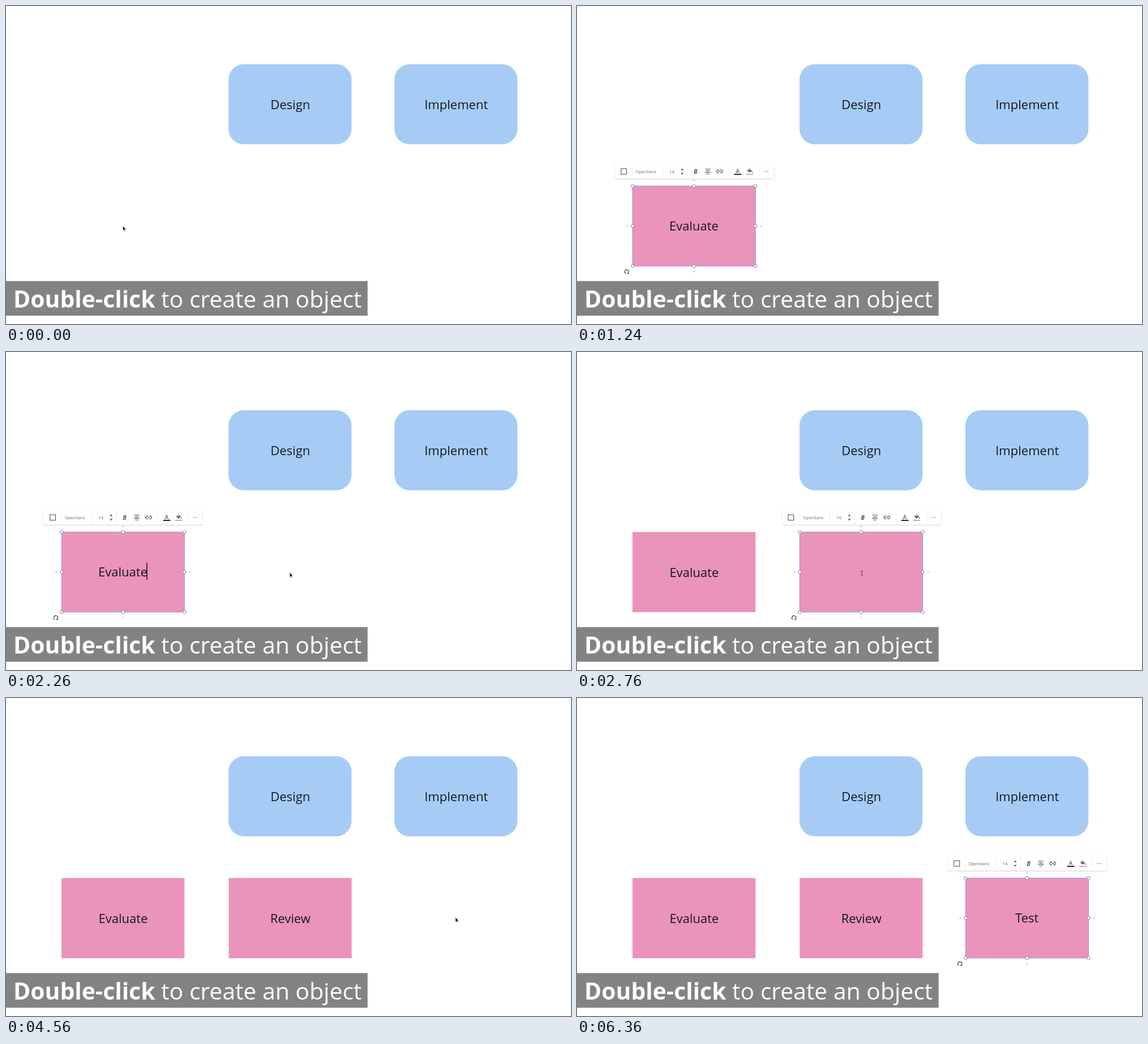
An HTML page for the animation above (6400 ms loop, 998 by 561 pixels).

```html
<!DOCTYPE html>
<html lang="en">
<head>
<meta charset="utf-8">
<title>Double-click to create an object</title>
<style>
  html, body { margin: 0; width: 100%; height: 100%; overflow: hidden; background: #fff; }
  svg { display: block; width: 998px; height: 561px; font-family: "Open Sans", sans-serif; }
  .label { font-size: 22px; fill: #16161f; text-anchor: middle; }
  .bar { filter: drop-shadow(0 1px 1.5px rgba(0,0,0,.16)); }
  .icon { fill: none; stroke: #555; stroke-width: 1.1; }
  .small { font-size: 7.6px; fill: #666; }
</style>
</head>
<body>
<svg viewBox="0 0 998 561">
  <defs>
    <g id="toolbar">
      <rect class="bar" x="67" y="279" width="280.5" height="25.5" rx="1" fill="#fff"/>
      <path d="M98.5 279v25M151.5 279v25M194.5 279v25M268.5 279v25M322.5 279v25" stroke="#f0f0f0"/>
      <rect class="icon" x="77.7" y="287" width="9.8" height="9.8"/>
      <text class="small" x="103.8" y="295">OpenSans</text>
      <path d="M183.2 289.6l2.6-3 2.6 3zM183.2 294.4l2.6 3 2.6-3z" fill="#555"/>
      <text x="206.3" y="295.6" font-size="10.5" font-weight="700" font-style="italic" fill="#555">B</text>
      <path class="icon" d="M226 287.8h10M228 290.6h6M226 293.4h10M228 296.2h6"/>
      <path class="icon" d="M250.8 289.4h-1.6a2.5 2.5 0 0 0 0 5h1.6M253.2 289.4h1.6a2.5 2.5 0 0 1 0 5h-1.6M249.6 291.9h4.8"/>
      <text x="283.8" y="294.8" font-size="10.5" text-anchor="middle" fill="#444">A</text>
      <path d="M277.7 297h12.6" stroke="#222" stroke-width="2"/>
      <path d="M301.6 290.4l3.2-3.2 3.6 3.6z" class="icon"/>
      <path d="M301.4 290.6h7l-3.6 3.4zM309.4 291.8q1.6 2.4 0 2.4t0-2.4z" fill="#555"/>
      <path d="M298.6 297h12.6" stroke="#e79ab8" stroke-width="2"/>
      <path d="M330.2 292h8" stroke="#888" stroke-width="1.3" stroke-dasharray="1.4 1.8"/>
    </g>
    <g id="frame">
      <rect x="98.2" y="317.8" width="217" height="141" fill="none" stroke="#9090dc"/>
      <g id="knobs" fill="#fff" stroke="#777" stroke-width=".9"></g>
      <g fill="#b9d3ee">
        <circle cx="206.7" cy="308" r="1.4"/><circle cx="206.7" cy="468.3" r="1.4"/>
        <circle cx="88.5" cy="388.2" r="1.4"/><circle cx="324.8" cy="388.2" r="1.4"/>
      </g>
      <path d="M86 472a3.7 3.7 0 1 1 5.5-2" fill="none" stroke="#333" stroke-width="1.1"/>
      <path d="M88.2 471.6l3.4-1.6v3.2z" fill="#333"/>
    </g>
  </defs>

  <g fill="#a6ccf6">
    <rect x="393" y="102.8" width="217.4" height="141.2" rx="27"/>
    <rect x="686" y="102.8" width="217.4" height="141.2" rx="27"/>
  </g>
  <text class="label" x="502.2" y="182">Design</text>
  <text class="label" x="795.2" y="182">Implement</text>
  <g id="cards"></g>
  <rect y="485.3" width="638.7" height="61.1" fill="#838383"/>
  <text x="13" y="531.6" font-size="40.9" fill="#fff"><tspan font-weight="700">Double-click</tspan> to create an object</text>
  <path id="arrow" d="M0 0v8l1.8-1.6 1.3 2.9 1.3-.6-1.3-2.8h2.3z" fill="#111" stroke="#fff" stroke-width=".4"/>
  <path id="beam" d="M-1.6-3.8q1.6 0 1.6 1v5.6q0 1-1.6 1M1.6-3.8q-1.6 0-1.6 1M0 2.8q0 1 1.6 1" fill="none" stroke="#333" stroke-width=".9"/>
</svg>
<script>
const LOOP = 6400, BLINK = 530;
const $ = id => document.getElementById(id);
const show = (el, on) => el.setAttribute('display', on ? 'inline' : 'none');
const place = (el, [x, y]) => el.setAttribute('transform', `translate(${x} ${y})`);

// start / end: selected span; delay / step: typing rhythm
const cards = [
  { word: 'Evaluate', dx: 0, start: 690, end: 2665, delay: 120, step: 50, size: 10 },
  { word: 'Review', dx: 295.3, start: 2700, end: 4400, delay: 200, step: 90, size: 10 },
  { word: 'Test', dx: 588.3, start: 5300, end: LOOP, delay: 250, step: 110, size: 14 }
];
const stops = [[206.5, 388], [501.2, 389], [794, 387]];
const moves = [[1500, 2200], [3500, 4005]];

for (const x of [98.2, 206.7, 315.2])
  for (const y of [317.8, 388.2, 458.8])
    if (x !== 206.7 || y !== 388.2)
      $('knobs').innerHTML += `<circle cx="${x}" cy="${y}" r="2.8"/>`;

$('cards').innerHTML = cards.map(c => `<g transform="translate(${c.dx} 0)">
  <rect x="98" y="317.6" width="217.3" height="141.4" fill="#eb94bb"/>
  <text class="label"></text>
  <g><use href="#toolbar"/><text class="small" x="167.6" y="295" text-anchor="middle"></text><use href="#frame"/></g>
  <path stroke="#16161f" stroke-width="1.6"/></g>`).join('');
cards.forEach((c, i) => {
  c.el = $('cards').children[i];
  [, c.label, c.tools, c.caret] = c.el.children;
  c.sizeText = c.tools.children[1];
});

function drawCard(c, t) {
  const age = t - c.start, selected = age >= 0 && t < c.end;
  show(c.el, age >= 0);
  show(c.tools, selected);
  if (age < 0) return;
  const count = Math.max(0, Math.floor((age - c.delay) / c.step) + 1);
  c.label.textContent = c.word.slice(0, count);
  c.label.setAttribute('x', selected ? 206.4 : 206.9);
  c.label.setAttribute('y', selected ? 395.7 : 396.7);
  c.sizeText.textContent = count ? 14 : c.size;
  show(c.caret, selected && age % BLINK >= BLINK / 2);
  c.caret.setAttribute('d', `M${205.4 + c.label.getComputedTextLength() / 2} 372v30`);
}

function drawPointer(t) {
  let pos = stops[0];
  moves.forEach(([from, to], i) => {
    const p = Math.min(1, Math.max(0, (t - from) / (to - from)));
    const e = p * p * (3 - 2 * p);
    if (p > 0) pos = stops[i].map((v, k) => v + (stops[i + 1][k] - v) * e);
  });
  const fresh = cards.some(c => t >= c.start && t < c.start + c.delay);
  const hidden = cards.some((c, i) => t >= c.start && t < (moves[i] ? moves[i][0] : LOOP));
  show($('arrow'), !hidden);
  show($('beam'), fresh);
  place($('arrow'), pos);
  place($('beam'), [pos[0] + 2, pos[1] + 1.3]);
}

function draw(now) {
  const t = now % LOOP;
  cards.forEach(c => drawCard(c, t));
  drawPointer(t);
}

let origin;
function tick(now) {
  origin ??= now;
  draw(now - origin);
  requestAnimationFrame(tick);
}
draw(0);
requestAnimationFrame(tick);
</script>
</body>
</html>
```
